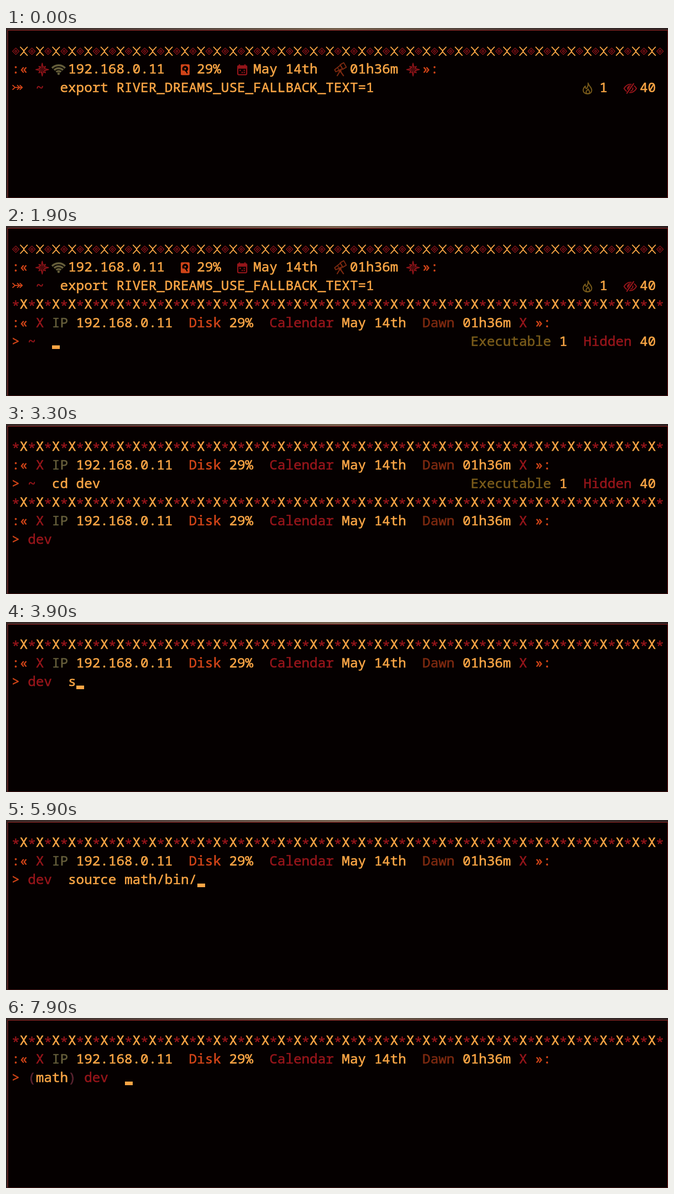
Animation of 1280x329 px, one loop 8000 ms. Source, as an HTML page with a canvas:

```html
<!DOCTYPE html>
<html lang="en">
<head>
<meta charset="utf-8">
<title>Terminal prompt</title>
<style>
html, body { margin: 0; width: 100%; height: 100%; overflow: hidden; background: #050000; }
canvas { display: block; width: 1280px; height: 329px; }
</style>
</head>
<body>
<canvas id="stage" width="1280" height="329"></canvas>
<script>
const ctx = document.getElementById('stage').getContext('2d');
const LOOP = 8000, LEFT = 11.6, CELL = 15.57, ROW = 36, BASE = 52, COLS = 81;
const BG = '#050000', AMBER = '#f9a545', RED = '#95151a', ORANGE = '#d04418',
      OLIVE = '#655d3a', RUST = '#7c2910', GOLD = '#7a5b1a', PLUM = '#5a232f';

const cellX = col => LEFT + col * CELL;

// Glyphs are centred in their cells; a thin outline gives a medium weight.
function text(str, col, row, color, dy = 0) {
  ctx.fillStyle = ctx.strokeStyle = color;
  ctx.lineWidth = 0.6;
  [...str].forEach((ch, i) => {
    if (ch === ' ') return;
    const x = cellX(col + i + 0.5) - 0.6, y = BASE + row * ROW + dy;
    ctx.fillText(ch, x, y);
    ctx.strokeText(ch, x, y);
  });
}

function line(points, color, width, close) {
  ctx.beginPath();
  points.forEach(([x, y]) => ctx.lineTo(x, y));
  if (close) ctx.closePath();
  ctx.strokeStyle = color;
  ctx.lineWidth = width;
  ctx.stroke();
}

function box(x, y, w, h, color, r = 0) {
  ctx.beginPath();
  ctx.roundRect(x, y, w, h, r);
  ctx.fillStyle = color;
  ctx.fill();
}

function disc(x, y, r, color) {
  ctx.beginPath();
  ctx.arc(x, y, r, 0, Math.PI * 2);
  ctx.fillStyle = color;
  ctx.fill();
}

function at(x, y, angle, draw) {
  ctx.save();
  ctx.translate(x, y);
  ctx.rotate(angle);
  draw();
  ctx.restore();
}

function compass(x, y) {
  const point = (i, r) => [r * Math.sin(i * Math.PI / 8), -r * Math.cos(i * Math.PI / 8)];
  const radius = i => i % 4 === 0 ? 12.5 : i % 2 ? 5 : 9;
  at(x, y, 0, () => {
    line(Array.from({ length: 16 }, (_, i) => point(i, radius(i))), RED, 1.5, true);
    ctx.fillStyle = RED;
    for (let i = 0; i < 16; i += 2) {
      ctx.beginPath();
      ctx.moveTo(0, 0);
      ctx.lineTo(...point(i, radius(i)));
      ctx.lineTo(...point(i + 1, radius(i + 1)));
      ctx.fill();
    }
  });
}

function wifi(x, y) {
  for (const r of [17.3, 11.7, 6.2]) {
    ctx.beginPath();
    ctx.arc(x, y, r, -Math.PI * 0.76, -Math.PI * 0.24);
    ctx.strokeStyle = OLIVE;
    ctx.lineWidth = 3.8;
    ctx.stroke();
  }
  disc(x, y - 1, 2.4, OLIVE);
}

function disk(x, y) {
  box(x - 8.5, y - 10.5, 17, 21, ORANGE, 2);
  disc(x, y - 2, 5.8, BG);
  disc(x, y - 2, 1.8, ORANGE);
  line([[x - 5, y + 6], [x - 1, y + 2]], ORANGE, 4);
  line([[x + 1, y + 1], [x + 4, y + 7]], BG, 2.2);
}

function calendar(x, y) {
  ctx.beginPath();
  ctx.roundRect(x - 8.6, y - 7.5, 17.2, 17, 2);
  ctx.strokeStyle = RED;
  ctx.lineWidth = 2.3;
  ctx.stroke();
  box(x - 9.5, y - 8, 19, 6, RED, 1);
  box(x - 6.5, y - 10.5, 2.4, 4, RED);
  box(x + 4.1, y - 10.5, 2.4, 4, RED);
  for (const [dx, dy] of [[-4, 1], [4, 1], [0, 5], [4, 5]]) box(x + dx - 1.2, y + dy - 1, 2.4, 2.4, RED);
}

function telescope(x, y) {
  at(x, y - 4, -0.52, () => {
    line([[-11, -2], [3, -4], [3, 4], [-11, 2.5]], RUST, 2, true);
    line([[3, -5], [11, -5], [11, 5], [3, 5]], RUST, 2, true);
    line([[-4, -2.5], [-4, 2.5]], RUST, 1.6);
  });
  disc(x, y + 2, 2.8, RUST);
  line([[x - 6, y + 12], [x, y + 2], [x + 7, y + 12]], RUST, 2.2);
}

function flame(x, y) {
  ctx.strokeStyle = GOLD;
  ctx.lineWidth = 2;
  ctx.stroke(new Path2D(`M${x + 1} ${y - 10.5}c1 6 7 8 7 14c0 4-3 7-8 7c-5 0-8.5-3-8.5-7
    c0-4 2-6 4-8c0 2 .5 4 2 5c3-3 4-7 3.5-11z`));
  ctx.stroke(new Path2D(`M${x + 1} ${y + 1}c-1 3-4 3-4 6c0 2 1.5 3 3 3c2 0 4-1 4-3c0-2-2-3-3-6z`));
}

function hiddenEye(x, y) {
  ctx.strokeStyle = RED;
  ctx.lineWidth = 2.2;
  ctx.stroke(new Path2D(`M${x - 12} ${y}q5-8 12-8t12 8q-5 8-12 8t-12-8z`));
  ctx.beginPath();
  ctx.arc(x, y, 5, 0, Math.PI * 2);
  ctx.stroke();
  disc(x - 2, y, 3.5, RED);
  line([[x - 7, y + 11], [x + 8, y - 11]], BG, 5);
  line([[x - 7, y + 10], [x + 7, y - 10]], RED, 2.2);
}

function iconDivider() {
  const y = 45;
  for (let i = 0; i < COLS; i++) {
    const x = cellX(i + 0.5) - 0.4;
    if (i % 2) {
      for (const side of [-1, 1]) {
        line([[x - 7.2, y + side * 8.7], [x, y + side], [x + 7.2, y + side * 8.7]], AMBER, 1.9);
      }
      box(x - 1.2, y - 2, 2.4, 4, AMBER);
    } else {
      for (const r of [6.3, 2.3]) line([[x - r, y], [x, y - r], [x + r, y], [x, y + r]], RED, 1.2, true);
    }
  }
}

function iconPrompt() {
  iconDivider();
  text(':«', 0, 1, ORANGE);
  compass(70, 80.5);
  wifi(101.7, 89.5);
  text('192.168.0.11', 7, 1, AMBER);
  disk(346.5, 80.8);
  text('29%', 23, 1, AMBER);
  calendar(456.7, 80.8);
  text('May 14th', 30, 1, AMBER);
  telescope(646, 81);
  text('01h36m', 42, 1, AMBER);
  compass(787, 80.5);
  text('»:', 51, 1, ORANGE);
  for (const x of [12.5, 21.5, 26.5]) line([[x, 110.5], [x + 5, 115], [x, 119.5]], ORANGE, 1.9);
  line([[17, 115], [31, 115]], ORANGE, 1.9);
  text('~', 3, 2, RED);
  flame(1124.5, 117);
  text('1', 73, 2, AMBER);
  hiddenEye(1207, 117);
  text('40', 78, 2, AMBER);
}

function textPrompt(row) {
  for (let i = 0; i < COLS; i++) {
    if (i % 2) text('X', i, row, AMBER);
    else text('*', i, row, RED, 4);
  }
  const parts = [
    [0, ':«', ORANGE], [3, 'X', RED], [5, 'IP', OLIVE], [8, '192.168.0.11', AMBER],
    [22, 'Disk', ORANGE], [27, '29%', AMBER], [32, 'Calendar', RED], [41, 'May 14th', AMBER],
    [51, 'Dawn', RUST], [56, '01h36m', AMBER], [63, 'X', RED], [65, '»:', ORANGE]
  ];
  for (const [col, str, color] of parts) text(str, col, row + 1, color);
  text('>', 0, row + 2, ORANGE);
}

// Each prompt has a column where the command starts and a drawing rule.
const prompts = {
  icon: { col: 6, draw: iconPrompt },
  home: { col: 5, draw(row) {
    textPrompt(row);
    text('~', 2, row + 2, RED);
    text('Executable', 57, row + 2, GOLD);
    text('1', 68, row + 2, AMBER);
    text('Hidden', 71, row + 2, RED);
    text('40', 78, row + 2, AMBER);
  } },
  dev: { col: 7, draw(row) {
    textPrompt(row);
    text('dev', 2, row + 2, RED);
  } },
  venv: { col: 14, draw(row) {
    textPrompt(row);
    text('(', 2, row + 2, PLUM);
    text('math', 3, row + 2, AMBER);
    text(')', 7, row + 2, PLUM);
    text('dev', 9, row + 2, RED);
  } }
};

const EXPORT = 'export RIVER_DREAMS_USE_FALLBACK_TEXT=1', CD = 'cd dev', SOURCE = 'source math/bin/activate';

// Scenes: start time, prompts from top to bottom with their commands.
const scenes = [
  [0, ['icon', EXPORT]],
  [1400, ['icon', EXPORT], ['home', '']],
  [2000, ['home', CD]],
  [3000, ['home', CD], ['dev', '']],
  [3500, ['dev', SOURCE]],
  [7400, ['dev', SOURCE], ['venv', '']],
  [7900, ['venv', '']]
];

// Typing: time, number of characters of the last command.
const typing = [
  [0, 99], [1400, 0], [2400, 1], [2500, 2], [2600, 3], [2700, 4], [2800, 5], [2900, 6],
  [3000, 0], [3900, 1], [4000, 2], [4200, 4], [4400, 5], [4500, 6], [4600, 7], [4700, 8],
  [4800, 9], [4900, 11], [5300, 12], [5400, 14], [5500, 15], [5900, 16], [6000, 18],
  [6600, 19], [6900, 24], [7400, 0]
];

// The cursor toggles at each of these times, hidden at first.
const blinks = [100, 300, 500, 700, 900, 1100, 1300, 1700, 1900, 2300, 2400, 3300, 3500,
  3800, 3900, 5200, 5300, 5800, 5900, 6300, 6500, 7200, 7400, 7600, 7700];

const current = (list, t) => list.findLast(item => item[0] <= t);

function windowFrame() {
  ctx.fillStyle = BG;
  ctx.fillRect(0, 0, 1280, 329);
  const sky = ctx.createLinearGradient(0, 0, 1280, 0);
  sky.addColorStop(0, '#352725');
  sky.addColorStop(0.25, '#54453f');
  sky.addColorStop(0.5, '#75624f');
  sky.addColorStop(0.75, '#483a35');
  sky.addColorStop(1, '#2c2020');
  ctx.fillStyle = sky;
  ctx.fillRect(0, 0, 1280, 4);
  box(0, 4, 3, 325, '#2b2020');
  box(3, 4, 1277, 1, '#952222');
  box(3, 4, 1, 325, '#8b2020');
  box(1279, 4, 1, 325, '#8b2020');
  box(3, 328, 1277, 1, '#4a1717');
}

function render(t) {
  windowFrame();
  ctx.font = '25.95px "Noto Sans Mono", monospace';
  ctx.textAlign = 'center';
  ctx.lineJoin = 'round';
  const blocks = current(scenes, t).slice(1);
  blocks.forEach(([name, command], i) => {
    const prompt = prompts[name], row = i * 3, last = i === blocks.length - 1;
    const shown = last ? command.slice(0, current(typing, t)[1]) : command;
    prompt.draw(row);
    text(shown, prompt.col, row + 2, AMBER);
    if (last && blinks.filter(b => b <= t).length % 2) {
      box(Math.round(cellX(prompt.col + shown.length)), 123 + row * ROW, 15, 7, AMBER);
    }
  });
}

function tick() {
  render(performance.now() % LOOP);
  requestAnimationFrame(tick);
}
tick();
</script>
</body>
</html>
```
